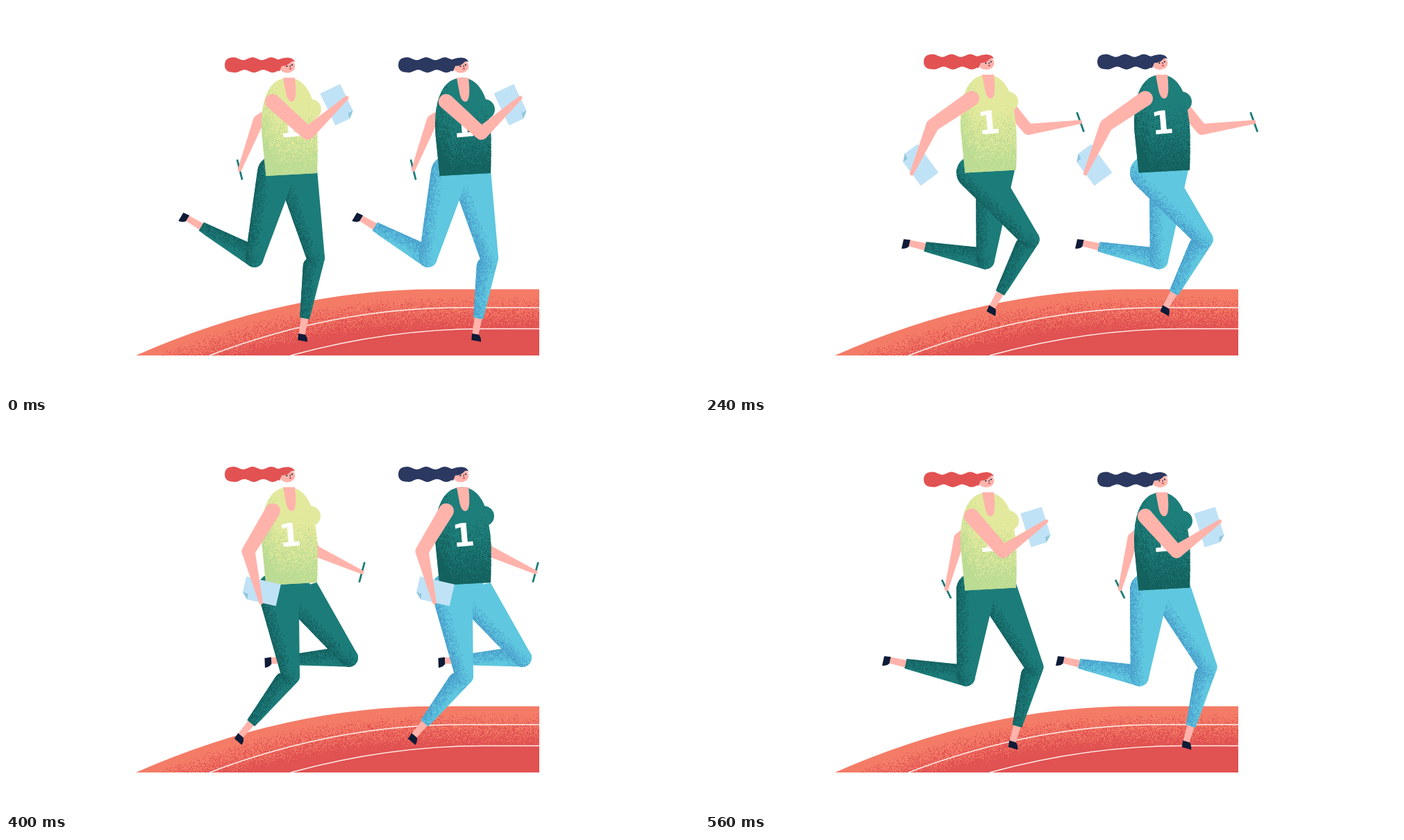
These frames come from a looping animation (998x561 px, 600 ms). An HTML page with a canvas:

```html
<!DOCTYPE html>
<html lang="en">
<head>
<meta charset="utf-8">
<title>Two runners</title>
<style>
  html, body { margin: 0; width: 100%; height: 100%; overflow: hidden; background: #fff; }
  canvas { display: block; }
</style>
</head>
<body>
<canvas id="stage" width="998" height="561"></canvas>
<script>
const ctx = document.getElementById('stage').getContext('2d');
const LOOP = 600, STEP = 40, RAD = Math.PI / 180;
const SKIN = '#ffb3ab', SHOE = '#0e1c38', TEAL = '#1c7c79';

// Keys: time, then values. Angles are degrees from straight down, positive forward.
const LEG = [ // thigh, shin
  [0, -12.9, -120.9], [80, 21.7, -107], [160, 50.8, -66], [240, 40.6, -29.4],
  [280, 28.4, -16.2], [320, 14.6, -10.3], [360, 11.3, -28.3], [400, 10.9, -40],
  [440, 6.4, -56.8], [480, 5.9, -70.3], [560, -4.6, -102.6]];
const NEAR_ARM = [ // upper arm, forearm
  [0, 48, 132.3], [80, 25.4, 99.6], [160, -14.9, 32], [240, -55.6, -23.5],
  [300, -62, -30], [360, -49.7, -12.4], [440, -10.5, 43.4], [560, 41.5, 124.9]];
const FAR_ARM = [ // upper arm, forearm, pen
  [0, -58.9, -21, -166], [80, -38, 8, -125], [160, 5, 51, -57], [240, 39.6, 98, 19.6],
  [300, 46, 115, 38], [360, 32.5, 90.7, 20], [440, 2, 40, -54], [560, -54.6, -14.4, -154]];
const TORSO = [ // body lift, bust y, bust right edge
  [0, 0, 149, 454], [80, -7.5, 142, 454], [160, -12, 128, 451], [240, -4.5, 138, 451],
  [300, -.5, 147, 453], [360, -7, 143, 455], [440, -13, 128, 451], [560, -3.5, 141, 452]];

// Periodic cubic through the keys.
function sample(keys, time) {
  const t = time % LOOP, n = keys.length;
  let i = n - 1;
  while (keys[i][0] > t) i--;
  const [a, b, c, d] = [-1, 0, 1, 2].map(o => {
    const j = i + o, row = keys[(j + n) % n];
    return [row[0] + LOOP * Math.floor(j / n), ...row.slice(1)];
  });
  const span = c[0] - b[0], u = (t - b[0]) / span, v = 1 - u;
  return b.slice(1).map((_, k) => {
    k++;
    const m1 = (c[k] - a[k]) / (c[0] - a[0]) * span;
    const m2 = (d[k] - b[k]) / (d[0] - b[0]) * span;
    return b[k] * v * v * (1 + 2 * u) + m1 * u * v * v + c[k] * u * u * (3 - 2 * u) - m2 * u * u * v;
  });
}

let seed = 7;
const random = () => (seed = seed * 16807 % 2147483647) / 2147483647;

// Speckled sprite: each pixel is set with the chance density(x, y).
function grain(w, h, color, density) {
  const sprite = document.createElement('canvas');
  sprite.width = w;
  sprite.height = h;
  const g = sprite.getContext('2d');
  g.fillStyle = color;
  for (let y = 0; y < h; y++)
    for (let x = 0; x < w; x++)
      if (random() < density(x, y)) g.fillRect(x, y, 1, 1);
  return sprite;
}

const fill = (path, color) => { ctx.fillStyle = color; ctx.fill(path); };
const reach = ([x, y], angle, length) =>
  [x + length * Math.sin(angle * RAD), y + length * Math.cos(angle * RAD)];

function local(x, y, degrees, draw) {
  ctx.save();
  ctx.translate(x, y);
  ctx.rotate(degrees * RAD);
  draw();
  ctx.restore();
}

// Two circles joined by their outer tangents.
function taper(path, [x1, y1], r1, [x2, y2], r2) {
  const dir = Math.atan2(y2 - y1, x2 - x1);
  const off = Math.acos((r1 - r2) / Math.hypot(x2 - x1, y2 - y1));
  const sub = new Path2D();
  sub.arc(x1, y1, r1, dir + off, dir - off + 2 * Math.PI);
  sub.arc(x2, y2, r2, dir - off, dir + off);
  sub.closePath();
  path.addPath(sub);
  return path;
}

function textured(path, color, drawGrain) {
  fill(path, color);
  ctx.save();
  ctx.clip(path);
  drawGrain();
  ctx.restore();
}

const clamp = v => Math.max(0, Math.min(1, v));
const thighGrain = color => grain(80, 175, color, (x, y) =>
  .85 * clamp(1 - (x - Math.max(0, y - 24) * .087) / 20) ** 1.2);
const shinGrain = color => grain(40, 110, color, (x, y) =>
  .75 * clamp(1 - (x - y * .09) / 19) + .35 * clamp(1 - y / 45));
const shirtGrain = color => grain(95, 150, color, (x, y) =>
  .95 * clamp((y - 45) / 85) ** 1.3 + .55 * clamp(1 - x / 24));

const runner = (x, hair, shirt, shirtShade, pants, pantsShade) => ({
  x, hair, shirt, pants,
  shirtGrain: shirtGrain(shirtShade),
  thighGrain: thighGrain(pantsShade),
  shinGrain: shinGrain(pantsShade)
});
const runners = [
  runner(0, '#e25253', '#e3e99c', '#bcdc93', TEAL, '#145f5f'),
  runner(250, '#2b3860', '#1e7e7a', '#14625f', '#5fc7df', '#4a9fcc')
];

const ANKLE = new Path2D('M-5.5 86H5.5L4.5 114H-4.5Z');
const FOOT = new Path2D('M-5 112L5 112Q9 115 10 121.5L-4 121.5Z');
const CHEST = new Path2D('M372 137C378 115 390 103.5 407 103.5C425 103.5 438 120 443 142' +
  'L447.5 172Q449.5 195 448 241L374.5 245L368.5 185Q366.5 157 372 137Z');
const NECK = new Path2D('M399 103.5H416Q420 138 411.5 138Q405 138 402.5 122Z');
const SHEET = new Path2D('M-16-25.5H16V17L7 25.5H-16Z');
const FOLD = new Path2D('M16 17L7 25.5L8 17.5Z');

const HAIR = (() => {
  const path = new Path2D('M315 85Q315 74 328 74');
  const wave = x => Math.cos((x - 328) * 2 * Math.PI / 27);
  for (let x = 330; x <= 392; x += 2) path.lineTo(x, 76 - 2 * wave(x));
  path.bezierCurveTo(402, 73, 414, 73, 416, 81);
  path.quadraticCurveTo(412, 78, 409, 82);
  path.quadraticCurveTo(404, 87, 397, 86.5);
  path.lineTo(394, 94);
  for (let x = 392; x >= 328; x -= 2) path.lineTo(x, 94 + 2 * wave(x - 2));
  path.quadraticCurveTo(315, 96, 315, 85);
  return path;
})();

function drawLeg(r, hip, front, time) {
  const [thigh, shin] = sample(LEG, time);
  const knee = reach(hip, thigh, 127);
  local(...knee, -shin, () => {
    fill(ANKLE, SKIN);
    fill(FOOT, SHOE);
    const calf = new Path2D('M-7 89L-16 14L13 0L7 89Z');
    taper(calf, [0, 0], 13, [0, 80], 7.8);
    const lower = new Path2D('M-40-20H30V89H-40Z');
    ctx.clip(lower);
    taper(calf, [-3.5, 13], 12.5, [0, 89], 7);
    textured(calf, r.pants, () => ctx.drawImage(r.shinGrain, -16, -13));
  });
  const upper = new Path2D();
  upper.moveTo(...hip);
  upper.lineTo(...front);
  upper.lineTo(...knee);
  upper.closePath();
  taper(upper, hip, 24, knee, 13);
  taper(upper, front, .5, knee, 13);
  textured(upper, r.pants, () =>
    local(...hip, -thigh, () => ctx.drawImage(r.thighGrain, -24, -24)));
}

function drawArm(shoulder, elbow, hand, r1, r2) {
  const path = taper(new Path2D(), shoulder, r1, elbow, r2);
  fill(taper(path, elbow, r2, hand, 2.8), SKIN);
}

function drawFarArm(time, lift) {
  const [upper, fore, pen] = sample(FAR_ARM, time);
  const shoulder = [422, 130 + lift];
  const elbow = reach(shoulder, upper, 68), hand = reach(elbow, fore, 76);
  local(...hand, -pen, () => {
    ctx.fillStyle = TEAL;
    ctx.fillRect(-1.4, -15, 2.8, 30);
  });
  drawArm(shoulder, elbow, hand, 9, 8);
}

function drawNearArm(time, lift) {
  const [upper, fore] = sample(NEAR_ARM, time);
  const shoulder = [384, 138 + lift];
  const elbow = reach(shoulder, upper, 68), hand = reach(elbow, fore, 76);
  local(...hand, 118 - 1.085 * fore, () => {
    ctx.translate(-16, 3.5);
    fill(SHEET, '#c0e2f6');
    fill(FOLD, '#8fc6dc');
  });
  drawArm(shoulder, elbow, hand, 11, 9.5);
}

function drawHead(hair) {
  const face = new Path2D();
  face.ellipse(405, 87, 11.3, 9.5, 0, 0, 7);
  fill(face, SKIN);
  fill(HAIR, hair);
  ctx.fillStyle = SHOE;
  ctx.fillRect(403.5, 86, 1.8, 1.8);
  ctx.fillRect(411, 84, 1.8, 1.8);
  ctx.fillRect(408.7, 85.5, .9, 3);
  ctx.fillStyle = '#c9404c';
  ctx.fillRect(408, 89.8, 3, 1.5);
}

function drawTorso(r, lift, bustY, bustEdge) {
  const body = new Path2D();
  body.addPath(CHEST, new DOMMatrix([1, 0, 0, 1, 0, lift]));
  const bust = new Path2D();
  bust.arc(bustEdge - 14.5, bustY, 14.5, 0, 7);
  body.addPath(bust);
  textured(body, r.shirt, () => ctx.drawImage(r.shirtGrain, 367, Math.round(100 + lift)));
  local(0, lift, 0, () => {
    fill(NECK, SKIN);
    drawHead(r.hair);
    local(410.3, 188.6, -5, () => {
      ctx.font = 'bold 46px "DejaVu Sans", sans-serif';
      ctx.textAlign = 'center';
      ctx.fillStyle = '#fff';
      ctx.fillText('1', 0, 0);
    });
  });
}

function drawRunner(r, time) {
  const [lift, bustY, bustEdge] = sample(TORSO, time);
  local(r.x, 0, 0, () => {
    drawFarArm(time, lift);
    drawLeg(r, [414, 240], [447, 230], time + 320);
    drawLeg(r, [386, 240], [421, 230], time);
    drawTorso(r, lift, bustY, bustEdge);
    drawNearArm(time, lift);
  });
}

// A bend that rises from the bottom edge at x0 and is level from x1 on.
const bend = (x0, x1, y) => `M${x0} 504Q${(x0 + x1) / 2} ${y} ${x1} ${y}H768`;
const TRACK = new Path2D(bend(187, 620, 408.5) + 'V504Z');
const LANES = new Path2D(bend(293, 655, 435) + bend(410, 690, 465.5));
const trackGrain = grain(581, 96, '#e15252', (x, y) => {
  const depth = y - 95.5 * Math.max(0, (433 - x) / 433) ** 2;
  return clamp((depth - 10) / 48);
});

function drawTrack() {
  textured(TRACK, '#f47c67', () => {
    ctx.drawImage(trackGrain, 187, 408);
    ctx.strokeStyle = '#fdeeea';
    ctx.lineWidth = 1.7;
    ctx.stroke(LANES);
  });
}

function frame(now) {
  const time = Math.floor(now % LOOP / STEP) * STEP;
  ctx.fillStyle = '#fff';
  ctx.fillRect(0, 0, 998, 561);
  drawTrack();
  for (const r of runners) drawRunner(r, time);
  requestAnimationFrame(frame);
}
requestAnimationFrame(frame);
</script>
</body>
</html>
```
